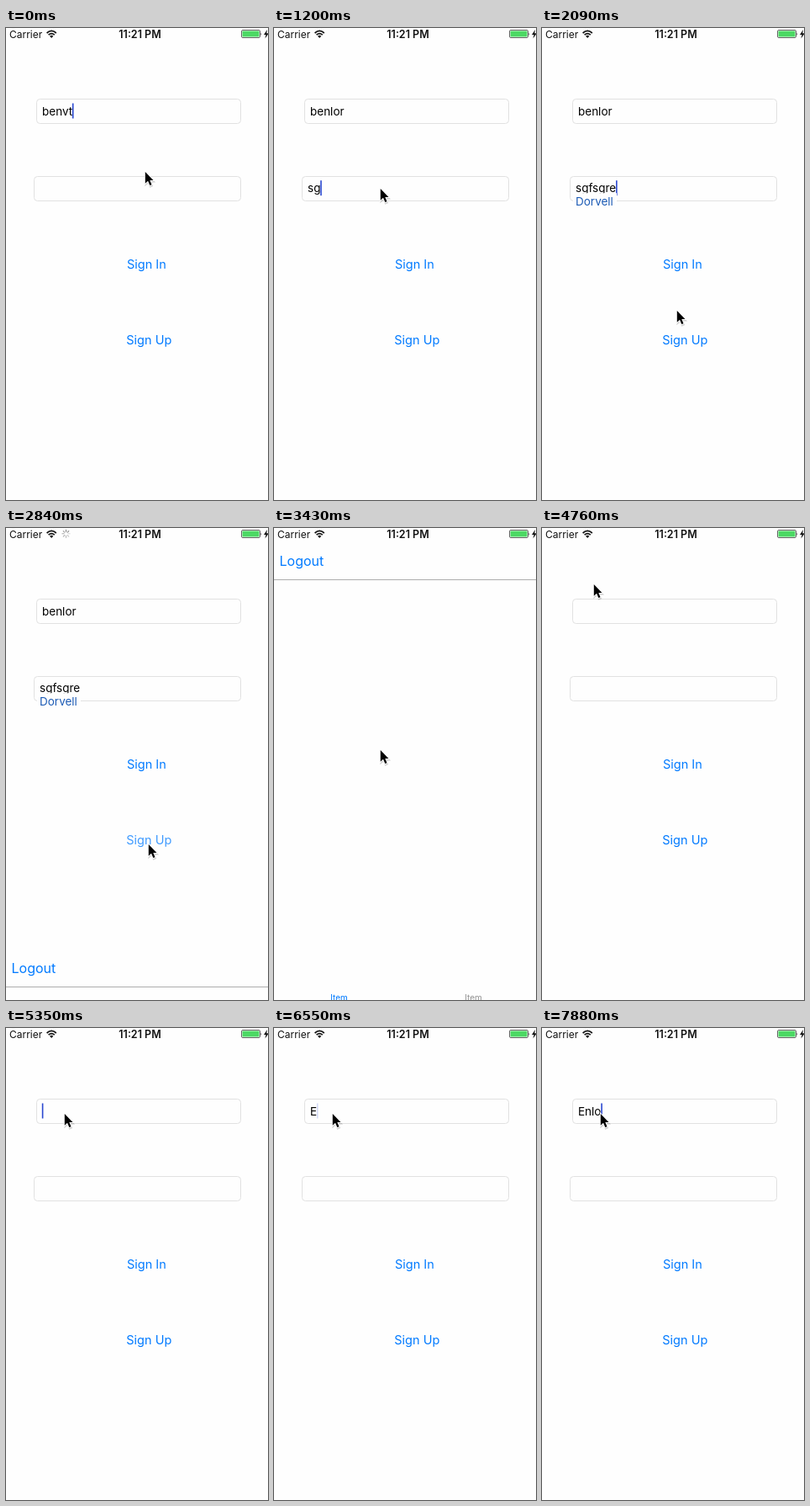
Recreate the animation shown at these times as an HTML page. Size 312 px wide and 561 px high, loop 8 s.

```html
<!DOCTYPE html>
<html lang="en">
<head>
<meta charset="utf-8">
<title>Sign in flow</title>
<style>
  html, body { margin: 0; width: 100%; height: 100%; overflow: hidden; background: #fefefe; }
  svg { display: block; width: 312px; height: 561px; font-family: Inter, Roboto, sans-serif; }
  .field { fill: #fefefe; stroke: #e1e1e1; }
  .input { font-size: 13.5px; fill: #000; }
  .link { font-size: 14.5px; fill: #007aff; }
  .status { font-size: 12px; fill: #111; }
  .tab { font-size: 10px; fill: #929292; }
</style>
</head>
<body>
<svg viewBox="0 0 312 561">
  <rect width="312" height="561" fill="#fefefe"/>

  <rect class="field" x="36.5" y="84.5" width="243" height="29" rx="4"/>
  <rect class="field" x="33.5" y="176.5" width="246" height="29" rx="4"/>
  <text class="input" id="user" x="43" y="103.5"></text>
  <text class="input" id="pass" x="40" y="195.2"></text>
  <rect id="caret" width="1.6" height="18" fill="#2a48d0"/>
  <g id="bubble">
    <rect x="-3" y="-15" width="52" height="20" fill="#fefefe"/>
    <text id="hint" font-size="13.5" fill="#1c5bb5"></text>
  </g>
  <text class="link" x="144" y="286">Sign In</text>
  <text class="link" id="signUp" x="143.3" y="376.3">Sign Up</text>

  <g id="modal">
    <rect width="312" height="561" fill="#fefefe"/>
    <text class="link" id="logout" x="6.5" y="45" style="font-size:16px">Logout</text>
    <rect y="61" width="312" height="1" fill="#adadad"/>
    <text class="tab" x="77.5" y="561.5" text-anchor="middle" style="fill:#007aff">Item</text>
    <text class="tab" x="237.5" y="561.5" text-anchor="middle">Item</text>
  </g>

  <text class="status" x="4" y="11.5">Carrier</text>
  <g fill="none" stroke="#111" stroke-width="1.7">
    <path d="M48.6 6 Q54.2 .9 59.8 6M50.6 8.2 Q54.2 5 57.8 8.2"/>
    <path d="M54.2 12 L52 9.6 Q54.2 7.7 56.4 9.6Z" fill="#111" stroke="none"/>
  </g>
  <g id="spinner" stroke="#888" stroke-width="1.1" stroke-linecap="round"></g>
  <text class="status" x="159.5" y="11.5" text-anchor="middle" font-weight="600" style="font-size:12.5px">11:21 PM</text>
  <rect x="280.5" y="2.5" width="22" height="9" rx="1.5" fill="#fefefe" stroke="#555" stroke-width=".9"/>
  <rect x="281.5" y="3.5" width="20" height="7" rx=".8" fill="#4cd964"/>
  <path d="M303.5 5.5 Q305.2 7.2 303.5 9Z" fill="#333"/>
  <path d="M311 2 L307 8 H309.5 L308.5 12.5 L313 6.2 H310.3Z" fill="#111"/>

  <g id="mouse">
    <g transform="translate(.8 1) scale(.92)">
      <path d="M0 0V15L3.5 11.8L6 17.5L8.4 16.5L6 11H10.5Z" fill="#000" stroke="#000" stroke-width="2" opacity=".18" transform="translate(.5 1.5)"/>
      <path d="M0 0V15L3.5 11.8L6 17.5L8.4 16.5L6 11H10.5Z" stroke="#fff" stroke-width="2" paint-order="stroke"/>
    </g>
  </g>
</svg>
<script>
const LOOP = 8000, HEIGHT = 561;
const OPEN_AT = 2804.7, CLOSE_AT = 4160;
const el = id => document.getElementById(id);
const show = (node, on) => node.setAttribute('visibility', on ? 'visible' : 'hidden');
const move = (node, x, y) => node.setAttribute('transform', `translate(${x} ${y})`);

// Each step changes only the listed parts of the state.
const steps = [
  [0, { at: [165, 170], user: 'benvt', pass: '', focus: 'user', caret: 1,
        hint: '', pressed: '', busy: false }],
  [150, { at: [150, 177], hint: 'benlor' }],
  [300, { at: [127, 189] }],
  [600, { at: [126, 190], user: 'benlor', hint: '', caret: 0 }],
  [750, { focus: 'pass', caret: 1 }],
  [1200, { pass: 'sg' }],
  [1350, { pass: 'sgf' }],
  [1500, { pass: 'sgfs' }],
  [1640, { pass: 'sgfsgr' }],
  [1790, { pass: 'sgfsgre', hint: 'Dorvell' }],
  [1940, { at: [138, 240] }],
  [2090, { at: [160, 335] }],
  [2240, { at: [169, 375] }],
  [2390, { pressed: 'signUp' }],
  [2540, { caret: 0.4 }],
  [2690, { caret: 0, busy: true }],
  [2840, {}],
  [2990, { at: [168, 368] }],
  [3130, { at: [155, 335], pressed: '', busy: false }],
  [3280, { at: [136, 285] }],
  [3430, { at: [126, 263], user: '', pass: '', hint: '' }],
  [3580, { at: [108, 205] }],
  [3730, { at: [68, 102] }],
  [3880, { at: [45, 48] }],
  [4030, { at: [40, 40], pressed: 'logout' }],
  [4170, { pressed: '' }],
  [4320, {}],
  [4470, { at: [43, 42] }],
  [4610, { at: [52, 52] }],
  [4760, { at: [61, 66] }],
  [4910, { at: [66, 83] }],
  [5060, { at: [69, 97] }],
  [5210, { at: [69, 101] }],
  [5350, { focus: 'user', caret: 1 }],
  [5950, { user: 'E' }],
  [6550, { caret: 0.2 }],
  [6700, { caret: 0 }],
  [6990, { caret: 0.5 }],
  [7140, { caret: 1 }],
  [7580, { user: 'En' }],
  [7730, { user: 'Enl' }],
  [7880, { user: 'Enlo' }]
];

const state = {};
const frames = steps.map(([time, change]) => ({ time, ...Object.assign(state, change) }));

const spokes = Array.from({ length: 8 }, (_, i) =>
  `<path d="M0-2.4V-4.6" transform="translate(71.5 6.8) rotate(${i * 45})"/>`);
el('spinner').innerHTML = spokes.join('');

// Remaining share of a critically damped slide.
function remaining(ms) {
  const u = Math.max(0, ms) * 0.01826;
  return (1 + u) * Math.exp(-u);
}

function modalTop(time) {
  const left = time < CLOSE_AT ? remaining(time - OPEN_AT) : 1 - remaining(time - CLOSE_AT);
  return Math.round(HEIGHT * left);
}

function draw(frame) {
  el('user').textContent = frame.user;
  el('pass').textContent = frame.pass;

  const input = el(frame.focus);
  const width = input.textContent ? input.getComputedTextLength() : 0;
  const left = +input.getAttribute('x'), base = +input.getAttribute('y');
  el('caret').setAttribute('x', left + width - 0.2);
  el('caret').setAttribute('y', base - 14);
  el('caret').setAttribute('opacity', frame.caret);

  el('hint').textContent = frame.hint;
  show(el('bubble'), frame.hint);
  move(el('bubble'), left, base + 16);

  const top = modalTop(frame.time);
  show(el('modal'), top < HEIGHT);
  move(el('modal'), 0, top);

  for (const id of ['signUp', 'logout']) el(id).setAttribute('opacity', frame.pressed === id ? 0.75 : 1);
  show(el('spinner'), frame.busy);
  [...el('spinner').children].forEach((spoke, i) =>
    spoke.setAttribute('opacity', 0.35 + 0.65 * ((i + Math.floor(frame.time / 125)) % 8) / 7));
  move(el('mouse'), ...frame.at);
}

const start = performance.now();
let current;
function tick() {
  const time = (performance.now() - start) % LOOP;
  const frame = frames.findLast(f => f.time <= time);
  if (frame !== current) draw(current = frame);
  requestAnimationFrame(tick);
}
tick();
</script>
</body>
</html>
```
